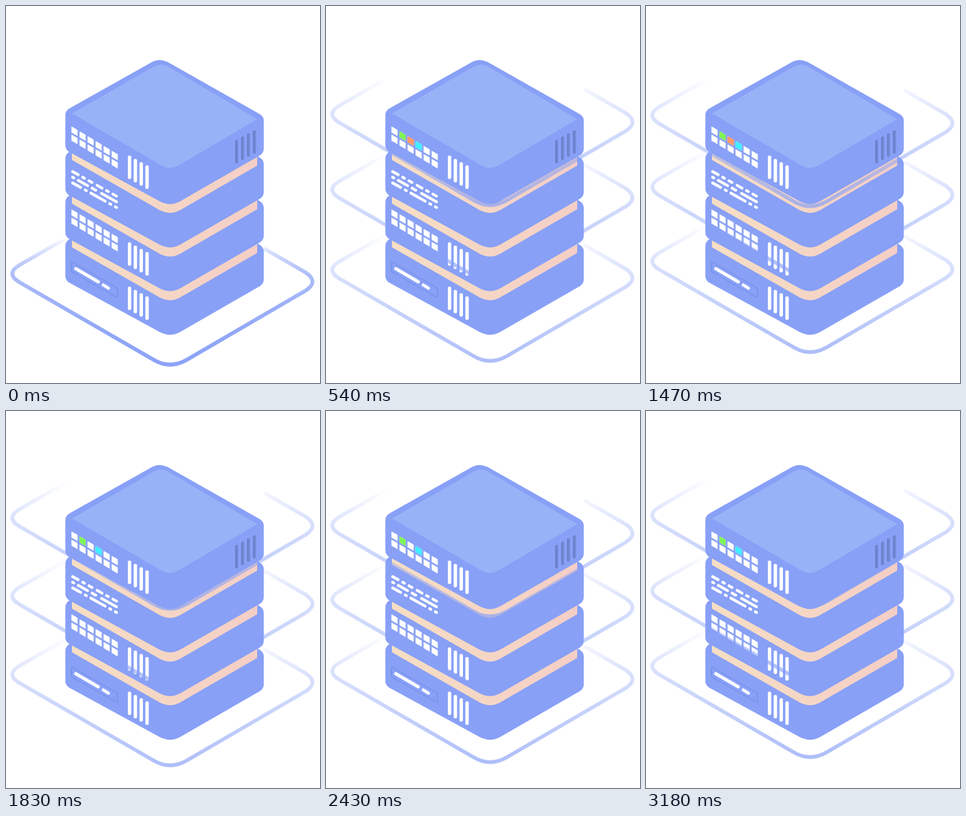
Write an HTML page that moves like this. It is 500 px wide and 600 px high and loops after 3210 ms.

```html
<!DOCTYPE html>
<html lang="en">
<head>
<meta charset="utf-8">
<title>Server stack</title>
<style>
  html, body { margin: 0; width: 100%; height: 100%; overflow: hidden; background: #fff; }
  svg { display: block; width: 500px; height: 600px; }
  .ring { fill: none; stroke: url(#fade); stroke-width: 6; animation: 3210ms cubic-bezier(.37, 0, .63, 1) infinite; }
  .low { animation-name: low; }
  .mid { animation-name: mid; }
  .high { animation-name: high; }
  .led { opacity: 0; animation: on 3210ms step-end infinite; }
  .blink { animation-name: blink; }
  .dash { stroke: #fff; stroke-linecap: round; fill: none; }

  /* Each ring leaves the base, then floats 20px up and down. */
  @keyframes low {
    0% { transform: translateY(0); }
    6.6% { transform: translateY(-20px); animation-timing-function: cubic-bezier(.33, .67, .67, 1); }
    29.2%, 64.3% { transform: translateY(0); }
    46.1%, 84.6%, 100% { transform: translateY(-20px); }
  }
  @keyframes mid {
    0% { transform: translateY(0); }
    13.8% { transform: translateY(-140px); animation-timing-function: cubic-bezier(.33, .67, .67, 1); }
    32.1%, 66.7% { transform: translateY(-120px); }
    49.4%, 91.3%, 100% { transform: translateY(-140px); }
  }
  @keyframes high {
    0% { transform: translateY(0); }
    18.7%, 53%, 97.3%, 100% { transform: translateY(-260px); }
    36.4%, 66.7% { transform: translateY(-240px); }
  }
  @keyframes on { 0% { opacity: 0; } .9%, 100% { opacity: 1; } }
  @keyframes blink {
    0%, 23.7%, 54.8%, 86%, 100% { opacity: 0; }
    13.9%, 45%, 76.2% { opacity: 1; }
  }
</style>
</head>
<body>
<svg viewBox="0 0 500 600">
  <defs>
    <linearGradient id="fade" gradientUnits="userSpaceOnUse" x1="0" y1="368" x2="0" y2="574">
      <stop offset="0" stop-color="#88a0f6" stop-opacity="0"/>
      <stop offset=".28" stop-color="#88a0f6" stop-opacity=".31"/>
      <stop offset="1" stop-color="#88a0f6" stop-opacity=".7"/>
    </linearGradient>
    <linearGradient id="peach">
      <stop offset="0" stop-color="#f6dec4"/>
      <stop offset="1" stop-color="#f4cec6"/>
    </linearGradient>
    <linearGradient id="slot">
      <stop offset="0" stop-color="#667bc4"/>
      <stop offset="1" stop-color="#788fdd"/>
    </linearGradient>

    <path id="slab" fill="#88a0f6" d="M94.5 174Q94.5 167 101 163L231 90Q244.500 82 259 90L404 172Q410.500 176 410.500 183V227Q410.500 234 404 238L277 311Q261 319.500 245 311L102 233Q94.500 229 94.500 222Z"/>
    <path id="gap" fill="url(#peach)" d="M105 231V245L245 325Q261 333.500 277 325L400 254V239L261 180Z"/>
    <path id="ring" d="M95 370L22 412Q-2 426 22 440L235 563Q261 578.500 288 563L477 453Q499 439 477 424L411 386"/>
    <g id="grid" fill="#fff"></g>
    <g id="bars" fill="#fff"></g>
  </defs>

  <use href="#slab" y="208"/>
  <use href="#gap" y="139"/>
  <use href="#slab" y="138.500"/>
  <use href="#gap" y="69.500"/>
  <use href="#slab" y="69"/>
  <use href="#gap"/>
  <use href="#slab"/>
  <path fill="#98b2f8" d="M105 171L231 99Q244.500 89 259 97L400 180L276 253Q261 262 246 253Z"/>

  <use href="#grid"/>
  <use href="#grid" y="132"/>
  <use href="#bars"/>
  <use href="#bars" y="138"/>
  <use href="#bars" y="208.500"/>
  <g id="leds"></g>
  <g id="vents" fill="url(#slot)"></g>
  <g id="lines" class="dash" stroke-width="4.400"></g>

  <path d="M104.500 407L177.500 449V464.500L104.500 423Z" fill="none" stroke="#7389e2"/>
  <path class="dash" stroke-width="5" d="M111 418L147 439M155 444L163 449"/>

  <use href="#ring" class="ring low"/>
  <use href="#ring" class="ring mid"/>
  <use href="#ring" class="ring high"/>
</svg>
<script>
  const add = (id, tag, attrs) => {
    const el = document.createElementNS('http://www.w3.org/2000/svg', tag);
    for (const key in attrs) el.setAttribute(key, attrs[key]);
    document.getElementById(id).append(el);
  };

  const tile = (col, row) => {
    const x = 104.5 + col * 12.8, y = 192 + col * 7.75 + row * 13;
    return `M${x} ${y}l9.200 5.300v9.200l-9.200 -5.300Z`;
  };
  for (let col = 0; col < 6; col++)
    for (let row = 0; row < 2; row++) add('grid', 'path', { d: tile(col, row), stroke: '#fff', 'stroke-width': .6, 'stroke-linejoin': 'round' });

  ['#7ff25a', '#ff9a6c', '#3eeeff'].forEach((fill, i) =>
    add('leds', 'path', { d: tile(i + 1, 0), fill, stroke: fill, 'stroke-width': .8, class: i === 1 ? 'led blink' : 'led' }));

  for (let i = 0; i < 4; i++) {
    add('bars', 'rect', { x: 194 + i * 9.3, y: 238 + i * 5.2, width: 5.4, height: 37.5, rx: 2.7 });
    add('vents', 'rect', { x: 365 + i * 9.4, y: 213 - i * 5.2, width: 5, height: 37.5, rx: 2.5 });
  }

  const rows = [
    [[106, 115], [122, 125], [132, 137], [145, 153], [160, 163], [170, 176]],
    [[106, 108], [115, 130], [137, 143], [152, 176]],
    [[106, 119], [126, 128], [135, 158], [165, 167], [174, 176]]
  ];
  const slope = x => 263.5 + (x - 106) * .56;
  rows.forEach((row, i) => row.forEach(([a, b]) =>
    add('lines', 'path', { d: `M${a} ${slope(a) + i * 9}L${b} ${slope(b) + i * 9}` })));
</script>
</body>
</html>
```
